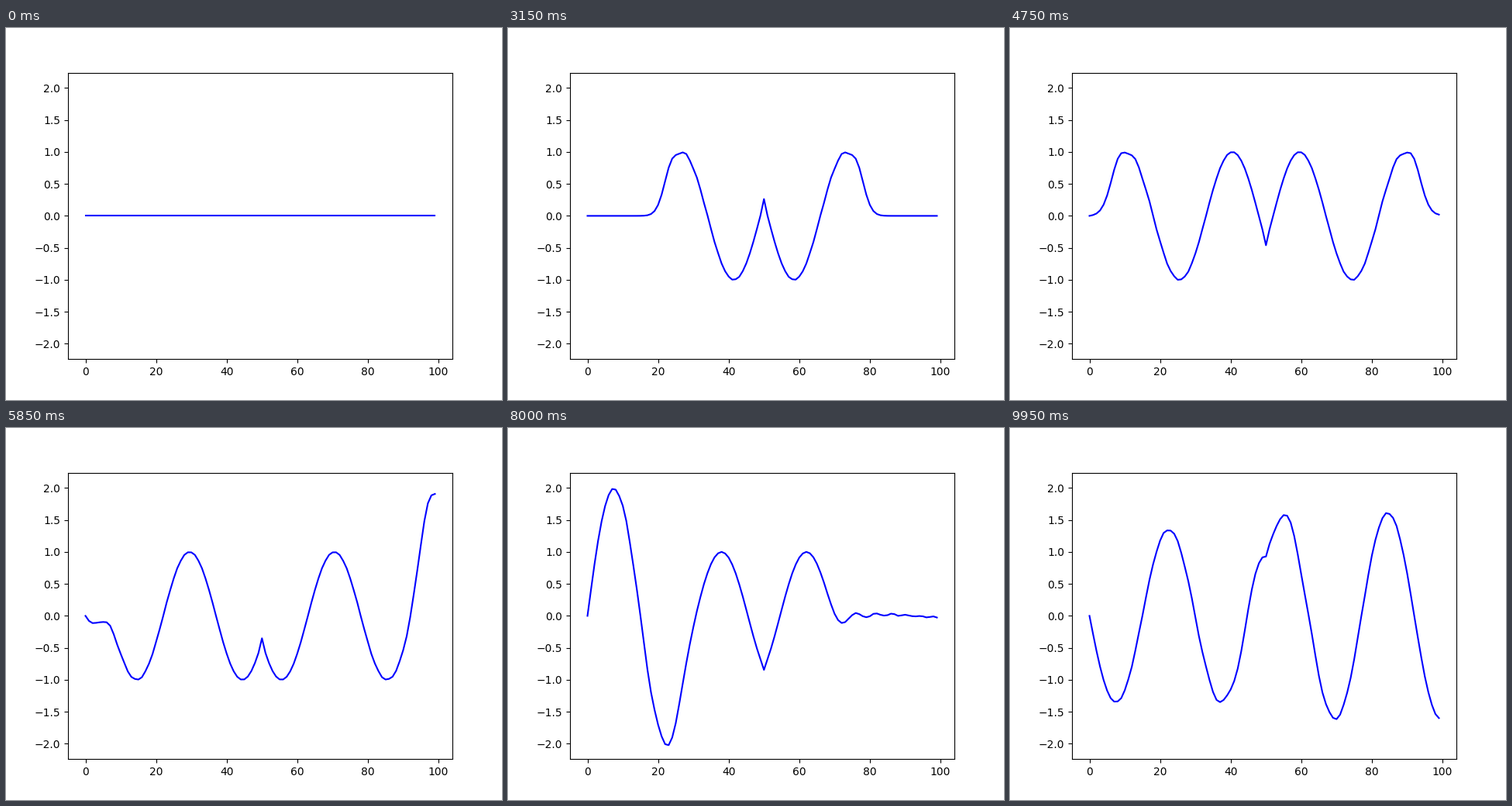
These frames come from a looping animation (640x480 px, 10000 ms). A matplotlib script:

```python
import numpy as np
import matplotlib.pyplot as plt
from matplotlib.animation import FuncAnimation

CELLS = 100
CENTER = 50
FRAMES = 200
COURANT = 0.5
OMEGA = 2 * np.pi * 1e9 * 0.01 * COURANT / 299792458  # 1 GHz on a 1 cm grid


def simulate():
    """Step a 1-D staggered grid: left end fixed at zero, right end open."""
    e = np.zeros(CELLS)
    h = np.zeros(CELLS)
    shown = [e.copy()]
    for n in range(1, FRAMES):
        h[:-1] += COURANT * (e[:-1] - e[1:])
        e[1:] += COURANT * (h[:-1] - h[1:])
        e[CENTER] = np.sin(OMEGA * (n - 1))
        view = e.copy()
        view[CENTER] = np.sin(OMEGA * (n - 0.5))  # driver leads by half a step
        shown.append(view)
    return shown


waves = simulate()

fig, ax = plt.subplots(figsize=(6.4, 4.8), dpi=100)
line, = ax.plot(np.arange(CELLS), waves[0], color="blue", linewidth=1.5)
ax.set_ylim(-2.24, 2.24)


def draw(n):
    line.set_ydata(waves[n])
    return line,


anim = FuncAnimation(fig, draw, frames=FRAMES, interval=50,
                     repeat=True, repeat_delay=0)
plt.show()
```
